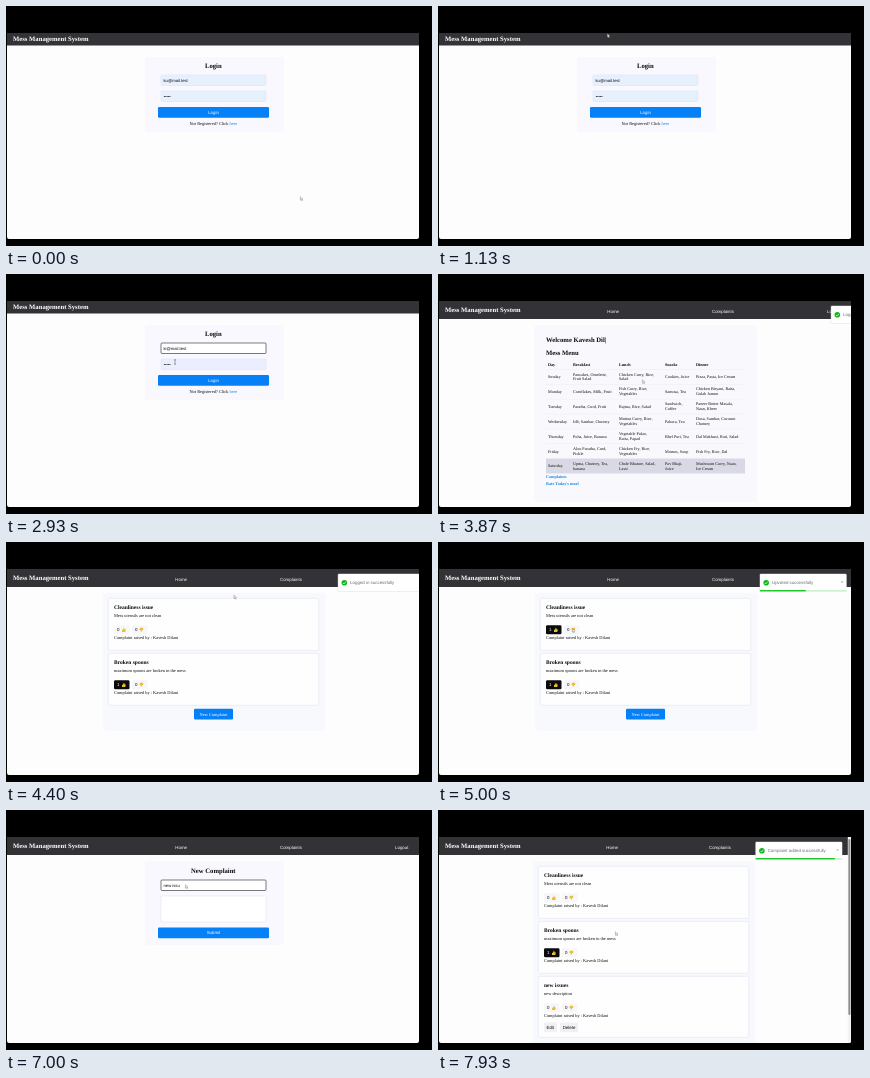
An HTML page for the animation above (8000 ms loop, 426 by 240 pixels).

```html
<!DOCTYPE html>
<html lang="en">
<head>
<meta charset="utf-8">
<title>Mess Management System</title>
<style>
  html, body { margin: 0; width: 100%; height: 100%; overflow: hidden; background: #000; }
  svg { display: block; width: 100vw; height: 100vh; }
  text { font-family: "Liberation Serif", serif; font-size: 4.4px; fill: #0c0c0c; text-rendering: geometricPrecision; white-space: pre; }
  .sans { font-family: "Liberation Sans", sans-serif; }
  .bold { font-weight: bold; }
  .h1 { font-weight: bold; font-size: 6.66px; }
  .h2 { font-weight: bold; font-size: 5.5px; }
  .cell { font-size: 4.16px; }
  .white { fill: #fff; }
  .link { fill: #1683e8; }
  .mid { text-anchor: middle; }
</style>
</head>
<body>
<svg id="stage" viewBox="0 0 426 240" preserveAspectRatio="none">
  <clipPath id="window"><path d="M1 27H413V231a2 2 0 0 1-2 2H3a2 2 0 0 1-2-2Z"/></clipPath>
  <g id="page" clip-path="url(#window)"></g>
</svg>
<script>
const LOOP = 8000, STEP = 1000 / 15, SLIDE = 90, TOAST_LIFE = 870;
const BLUE = '#0580f7', FILLED = '#e7f1fd';
const USER = 'Kavesh Dilani';
const page = document.getElementById('page');

// Scene starts
const HOME = 3550, COMPLAINTS = 4330, FORM = 6500, ADDED = 7760;

const menu = [
  ['Sunday', 'Pancakes, Omelette,/Fruit Salad', 'Chicken Curry, Rice,/Salad', 'Cookies, Juice', 'Pizza, Pasta, Ice Cream'],
  ['Monday', 'Cornflakes, Milk, Fruit', 'Fish Curry, Rice,/Vegetables', 'Samosa, Tea', 'Chicken Biryani, Raita,/Gulab Jamun'],
  ['Tuesday', 'Paratha, Curd, Fruit', 'Rajma, Rice, Salad', 'Sandwich,/Coffee', 'Paneer Butter Masala,/Naan, Kheer'],
  ['Wednesday', 'Idli, Sambar, Chutney', 'Mutton Curry, Rice,/Vegetables', 'Pakora, Tea', 'Dosa, Sambar, Coconut/Chutney'],
  ['Thursday', 'Poha, Juice, Banana', 'Vegetable Pulao,/Raita, Papad', 'Bhel Puri, Tea', 'Dal Makhani, Roti, Salad'],
  ['Friday', 'Aloo Paratha, Curd,/Pickle', 'Chicken Fry, Rice,/Vegetables', 'Momos, Soup', 'Fish Fry, Rice, Dal'],
  ['Saturday', 'Upma, Chutney, Tea,/banana', 'Chole Bhature, Salad,/Lassi', 'Pav Bhaji,/Juice', 'Mushroom Curry, Naan,/Ice Cream']
];
const columns = [110, 135, 181, 227, 258];

// start, end, message
const toasts = [
  [3847, 4480, 'Logged in successfully'],
  [4500, 5270, 'Upvoted successfully'],
  [5270, 5850, 'Downvoted successfully'],
  [5857, 6820, 'Downvote removed'],
  [7770, 8700, 'Complaint added successfully']
];

// time, x, y
const pointer = [
  [0, 295, 192], [400, 290, 180], [1000, 170, 29], [1450, 170, 29], [1800, 172, 74],
  [2650, 172, 74], [2900, 169, 88], [3000, 169, 88], [3300, 205, 107], [3880, 205, 107],
  [4200, 284, 38], [4350, 284, 38], [4480, 116, 88], [4750, 116, 88], [4950, 135, 88],
  [6100, 134, 90], [6400, 207, 172], [6550, 207, 172], [6700, 180, 76], [7050, 180, 76],
  [7150, 180, 94], [7500, 180, 94], [7680, 178, 123], [LOOP, 178, 123]
];

const text = (x, y, s, cls = '', extra = '') => `<text x="${x}" y="${y}" class="${cls}" ${extra}>${s}</text>`;
const rect = (x, y, w, h, fill, r = 0, extra = '') =>
  `<rect x="${x}" y="${y}" width="${w}" height="${h}" fill="${fill}" rx="${r}" ${extra}/>`;
const outline = color => `stroke="${color}" stroke-width=".6"`;
const shift = (x, y, body) => `<g transform="translate(${x} ${y})">${body}</g>`;
const typed = (s, t, start, perChar) => s.slice(0, Math.max(0, Math.floor((t - start) / perChar)));
const button = (x, y, w, h, label, cls) =>
  rect(x, y, w, h, BLUE, 1.2) + text(x + w / 2, y + h / 2 + 1.5, label, cls + ' white mid');

function header(height, scrolled) {
  const title = text(7, 29 + height / 2 + .1, 'Mess Management System', 'h1 white');
  const bar = rect(1, 27, 412, height, '#333237') + title;
  if (height < 18) return bar;
  const back = scrolled ? 1 : 0;
  return bar + text(169.3 - back, 38.7, 'Home', 'sans white') +
    text(274 - 3 * back, 38.7, 'Complaints', 'sans white') +
    text(389 - 4 * back, 38.7, 'Logout', 'sans white');
}

function field(y, h, value, focused, fill) {
  const edge = focused ? '#222' : '#dfe6f2';
  return rect(155, y, 105, h, focused ? '#fff' : fill, 1, outline(edge)) +
    text(157.5, y + 6.7, value, 'sans', 'style="font-size:4.2px"');
}

function login(t) {
  const editing = t >= 1850;
  const email = editing ? typed('ki@mail.test', t, 2000, 50) : 'ku@mail.test';
  let dots = '';
  for (let i = 0; i < 5; i++) dots += `<circle cx="${158.4 + i * 1.4}" cy="90.5" r=".6" fill="#222"/>`;
  return header(12.5) + rect(139, 51, 139, 75, '#f8f8fe', 2) +
    text(207.3, 62, 'Login', 'h1 mid') +
    field(69, 10.5, email, editing && t < 3250, FILLED) +
    field(85, 10.5, '', false, editing ? '#ebeefe' : FILLED) + dots +
    button(152, 101, 111, 10.8, 'Login', 'sans') +
    text(207.3, 118.6, 'Not Registered? Click <tspan class="link">here</tspan>', 'mid');
}

function home(t) {
  const caret = t < 4050 || Math.floor(t / 200) % 2 ? '|' : '';
  const welcome = typed('Welcome ' + USER, t, HOME, 17.4);
  let out = header(18) + rect(96, 51, 223, 177, '#f9f9fd', 2) +
    text(108, 68, welcome + caret, 'h1') + text(108, 81.2, 'Mess Menu', 'h1');
  ['Day', 'Breakfast', 'Lunch', 'Snacks', 'Dinner'].forEach((s, i) => out += text(columns[i], 91.8, s, 'cell bold'));
  menu.forEach((row, r) => {
    const mid = 102.7 + r * 14.9;
    out += rect(108, mid - 7.6, 199, r === 6 ? 15 : .4, r === 6 ? '#d9d9e6' : '#e6e6ee');
    row.forEach((cell, c) => {
      const lines = cell.split('/');
      lines.forEach((s, i) => out += text(columns[c], mid + 1.3 + (i - (lines.length - 1) / 2) * 4.9, s, 'cell'));
    });
  });
  return out + text(108, 203.8, 'Complaints', 'cell bold link') + text(108, 211.4, "Rate Today's meal", 'cell bold link');
}

function vote(x, y, count, active, down) {
  const thumb = '<path d="M-1.9-.2H-.7L.3-2.6Q1.3-2.5.9-.6H2.1Q2.7-.4 2.3 1.8Q2.1 2.5 1.2 2.5H-1.9Z" fill="#efbd2f"/>';
  return rect(x, y, 15.5, 9, active ? '#0b0b0d' : '#f7f7fa', 1.3) +
    text(x + 3, y + 6, count, 'sans' + (active ? ' white' : '')) +
    `<g transform="translate(${x + 9.6} ${y + 4.5}) scale(.85)${down ? ' rotate(180)' : ''}">${thumb}</g>`;
}

function complaint(y, h, title, body, up, down) {
  return rect(102.3, y, 210.5, h, '#fefeff', 1.5, outline('#dde2ee')) +
    text(108, y + 11, title, 'h2') + text(108, y + 19, body) +
    vote(108, y + 27, up, up, false) + vote(126, y + 27, down, down, true) +
    text(108, y + 40.4, 'Complaint raised by : ' + USER);
}

function complaints(t) {
  const added = t >= ADDED;
  const up = +(t >= 4500 && t < 5270), down = +(t >= 5270 && t < 5857);
  let body = rect(97, 51, 222, added ? 190 : 138, '#f8f9fd', 2) +
    complaint(56.3, 52, 'Cleanliness issue', 'Mess utensils are not clean', up, down) +
    complaint(111.3, 52, 'Broken spoons', 'maximum spoons are broken in the mess', 1, 0);
  if (!added) return header(18) + body + button(188, 166.8, 39, 10.6, 'New Complaint', '');
  body += complaint(166.3, 61, 'new issues', 'new description', 0, 0) +
    rect(108, 212.5, 13, 9.5, '#f1f1f5', 1.2) + text(110.5, 218.8, 'Edit', 'sans') +
    rect(124, 212.5, 18, 9.5, '#f1f1f5', 1.2) + text(126.7, 218.8, 'Delete', 'sans');
  return header(18, true) + shift(-2, 0, body) +
    rect(409.8, 27, 3.2, 206, '#f4f4f4') + rect(410.4, 29, 2, 176, '#8b8b90', 1);
}

function form(t) {
  return header(18) + rect(139, 51, 139, 84, '#f8f8fe', 2) +
    text(207.3, 63, 'New Complaint', 'h1 mid') +
    field(70, 10.5, typed('new issues', t, 6750, 30), t > 6700 && t < 7100, '#fff') +
    field(86, 26, typed('new description', t, 7150, 22), t >= 7100 && t < 7550, '#fff') +
    button(152, 117.5, 111, 10.8, 'Submit', 'sans');
}

function toast(t) {
  const item = toasts.find(([start, end]) => t >= start && t < end);
  if (!item) return '';
  const [start, end, message] = item;
  const away = Math.max(0, 1 - (t - start) / SLIDE, 1 - (end - t) / SLIDE);
  const left = Math.max(0, 1 - Math.max(0, t - start - SLIDE) / TOAST_LIFE);
  const progress = rect(322, 48, 86.5, 1.4, '#cdf0cf') + rect(322, 48, 86.5 * left, 1.4, '#1fc827');
  return shift(away * 91 - (t >= ADDED ? 4.3 : 0), 0,
    rect(321.5, 31.5, 87, 18, '#c9c9d2', 1.3, 'opacity=".55"') + rect(322, 32, 86.5, 17, '#fff', 1) +
    '<circle cx="328.2" cy="40.8" r="2.8" fill="#12b81b"/>' +
    '<path d="M326.8 40.9l1 1 1.9-2.1" fill="none" stroke="#fff" stroke-width=".7"/>' +
    text(334, 42.3, message, 'sans', 'style="fill:#6c6c72"') +
    '<path d="M403.2 39l1.5 1.7m0-1.7l-1.5 1.7" stroke="#888" stroke-width=".5"/>' +
    (away ? '' : progress));
}

function cursor(t) {
  const i = pointer.findIndex(p => p[0] > t);
  const [t0, x0, y0] = pointer[i - 1], [t1, x1, y1] = pointer[i];
  const k = (t - t0) / (t1 - t0), ease = k * k * (3 - 2 * k);
  const x = x0 + (x1 - x0) * ease, y = y0 + (y1 - y0) * ease;
  const inField = t < HOME && x > 155 && x < 260 && ((y > 69 && y < 80) || (y > 85 && y < 96));
  return shift(x, y, inField
    ? '<path d="M-.9-2.2H.9M0-2.2V2.2M-.9 2.2H.9" stroke="#444" stroke-width=".5"/>'
    : '<path d="M-.6-1.2V2.2L.2 1.5.8 2.7 1.4 2.4.9 1.3 2 1.2Z" fill="#fff" stroke="#666" stroke-width=".4"/>');
}

function draw(t) {
  const scene = t < HOME ? login : t < COMPLAINTS ? home : t < FORM || t >= ADDED ? complaints : form;
  page.innerHTML = rect(1, 27, 412, 206, '#fdfdfe') + scene(t) + toast(t) + cursor(t);
}

const began = performance.now();
let shown = -1;
function tick() {
  const t = (performance.now() - began) % LOOP;
  const step = Math.floor((t + 4) / STEP) % Math.round(LOOP / STEP);
  if (step !== shown) draw((shown = step) * STEP);
  requestAnimationFrame(tick);
}
tick();
</script>
</body>
</html>
```
